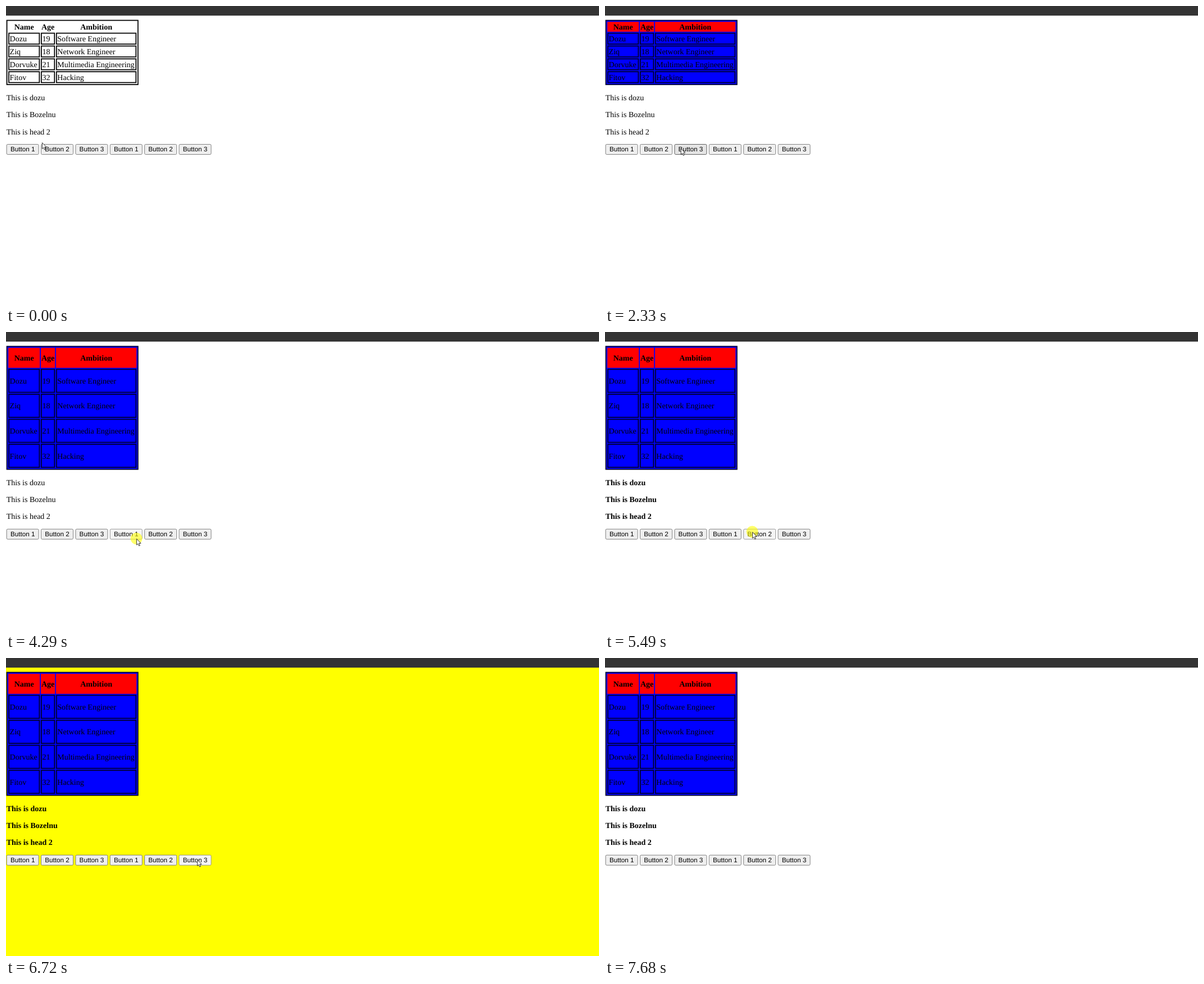
An HTML page for the animation above (8.53 s loop, 1055 by 531 pixels).

```html
<!DOCTYPE html>
<html lang="en">
<head>
<meta charset="utf-8">
<title>Button events</title>
<style>
  html, body { margin: 0; width: 100%; height: 100%; overflow: hidden; background: #fff; }
  svg { display: block; }
  text { font: 14px "Liberation Serif", serif; text-rendering: geometricPrecision; }
  .bold { font-weight: bold; }
  .mid { text-anchor: middle; }
  .label { font: 11.7px "Liberation Sans", sans-serif; text-anchor: middle; }
</style>
</head>
<body>
<svg id="stage" width="1055" height="531" viewBox="0 0 1055 531"></svg>
<script>
const LOOP = 8530;
const LINE = 1.76;
const LEFT = 0.7;
const TOP = 24.7;
const COL_WIDTHS = [56, 25.2, 143.2];
const HEAD = ['Name', 'Age', 'Ambition'];
const ROWS = [
  ['Dozu', '19', 'Software Engineer'],
  ['Ziq', '18', 'Network Engineer'],
  ['Dorvuke', '21', 'Multimedia Engineering'],
  ['Fitov', '32', 'Hacking']
];
const NOTES = ['This is dozu', 'This is Bozelnu', 'This is head 2'];
const BUTTON = { w: 57.9, h: 18.9, pitch: 61.36 };

// Page changes, pointer stops and mouse presses, all in ms
const CHANGE = { red: 890, blue: 2040, tall: 2940, bold: 4500, yellow: 6320, white: 6810 };
const START = { x: 64, y: 243 };
const STOPS = [
  { from: 0, to: 430, x: 29, y: 262 },
  { from: 1150, to: 1710, x: 88, y: 256 },
  { from: 2130, to: 2470, x: 148, y: 252.5 },
  { from: 2940, to: 3560, x: 232, y: 368 },
  { from: 4570, to: 5210, x: 262, y: 356 },
  { from: 5690, to: 6110, x: 340, y: 359 },
  { from: 7110, to: 7320, x: 610, y: 428 },
  { from: 7470, to: 7680, x: 1060, y: 535 }
];
const PRESSES = [610, 1710, 2540, 3630, 4290, 5490, 6110, 6520];
const GLOW_MS = 200;
const HELD_MS = 280;
const STEP_MS = 70;

const LOOKS = {
  normal: ['#efefef', '#767676'],
  hover: ['#e5e5e5', '#4f4f4f'],
  active: ['#f5f5f5', '#8d8d8d']
};

const during = (t, from, to) => t >= from && t < to;
const pressedFor = (t, ms) => PRESSES.some(p => during(t, p, p + ms));
const easeOut = p => 1 - (1 - p) ** 2;

const rect = (x, y, w, h, fill, more = '') =>
  `<rect x="${x}" y="${y}" width="${w}" height="${h}" fill="${fill}" ${more}/>`;
const outlined = (x, y, w, h, fill, edge, line, more = '') =>
  rect(x + line / 2, y + line / 2, w - line, h - line, fill, `stroke="${edge}" stroke-width="${line}" ${more}`);
const text = (x, y, words, cls = '') => `<text x="${x}" y="${y}" class="${cls}">${words}</text>`;

function pointerAt(t) {
  const now = Math.floor(t / STEP_MS) * STEP_MS;
  let { x, y } = START;
  for (const stop of STOPS) {
    const p = easeOut(Math.min(1, Math.max(0, (now - stop.from) / (stop.to - stop.from))));
    x += (stop.x - x) * p;
    y += (stop.y - y) * p;
  }
  return { x, y, shown: t < STOPS[STOPS.length - 1].to };
}

function table(headH, cellH, red, blue) {
  const ink = blue ? '#000030' : '#000';
  const headY = TOP + 2 * LINE;
  const rowY = i => headY + headH + LINE + i * (cellH + LINE);
  const bottom = rowY(ROWS.length) + LINE;
  let x = LEFT + 2 * LINE;
  let cells = '';
  COL_WIDTHS.forEach((w, c) => {
    if (red) cells += rect(x, headY, w, headH, '#f00');
    cells += text(x + w / 2, headY + headH / 2 + 4.8, HEAD[c], 'bold mid');
    ROWS.forEach((row, r) => {
      cells += outlined(x, rowY(r), w, cellH, 'none', ink, LINE);
      cells += text(x + 2.4, rowY(r) + cellH / 2 + 4.9, row[c]);
    });
    x += w + LINE;
  });
  const back = outlined(LEFT, TOP, x + LINE - LEFT, bottom - TOP, blue ? '#00f' : 'none', ink, LINE);
  return { svg: back + cells, bottom };
}

function buttons(y, pointer, held) {
  const { w, h, pitch } = BUTTON;
  let svg = '';
  for (let i = 0; i < 6; i++) {
    const x = LEFT + i * pitch;
    const over = pointer.shown && during(pointer.x, x, x + w) && during(pointer.y, y, y + h);
    const [fill, edge] = LOOKS[!over ? 'normal' : held ? 'active' : 'hover'];
    svg += outlined(x, y, w, h, fill, edge, 0.9, 'rx="2"');
    svg += text(x + w / 2, y + 13.4, 'Button ' + (i % 3 + 1), 'label');
  }
  return svg;
}

function arrow({ x, y }) {
  return `<path transform="translate(${x} ${y})" fill="#fff" stroke="#222" stroke-width=".9"
    d="M.4 .6V11.5L2.8 9.2L4.5 13.1L6.3 12.3L4.7 8.5H8Z"/>`;
}

function scene(t) {
  const tall = t >= CHANGE.tall;
  const pointer = pointerAt(t);
  const grid = table(tall ? 35.6 : 17.6, tall ? 42.8 : 21.12, t >= CHANGE.red, t >= CHANGE.blue);

  let svg = rect(0, 0, 1055, 531, during(t, CHANGE.yellow, CHANGE.white) ? '#ff0' : '#fff');
  svg += rect(0, 0, 1055, 17.15, '#343434') + grid.svg;
  NOTES.forEach((note, i) => {
    svg += text(LEFT, grid.bottom + 27.1 + i * 30.35, note, t >= CHANGE.bold ? 'bold' : '');
  });
  svg += buttons(grid.bottom + 105.2, pointer, pressedFor(t, HELD_MS));
  if (pressedFor(t, GLOW_MS)) {
    svg += `<circle cx="${pointer.x}" cy="${pointer.y}" r="10.5" fill="#ff0" fill-opacity=".58"/>`;
  }
  return pointer.shown ? svg + arrow(pointer) : svg;
}

const stage = document.getElementById('stage');
let drawn = '';
function tick() {
  const next = scene(performance.now() % LOOP);
  if (next !== drawn) stage.innerHTML = drawn = next;
  requestAnimationFrame(tick);
}
tick();
</script>
</body>
</html>
```
